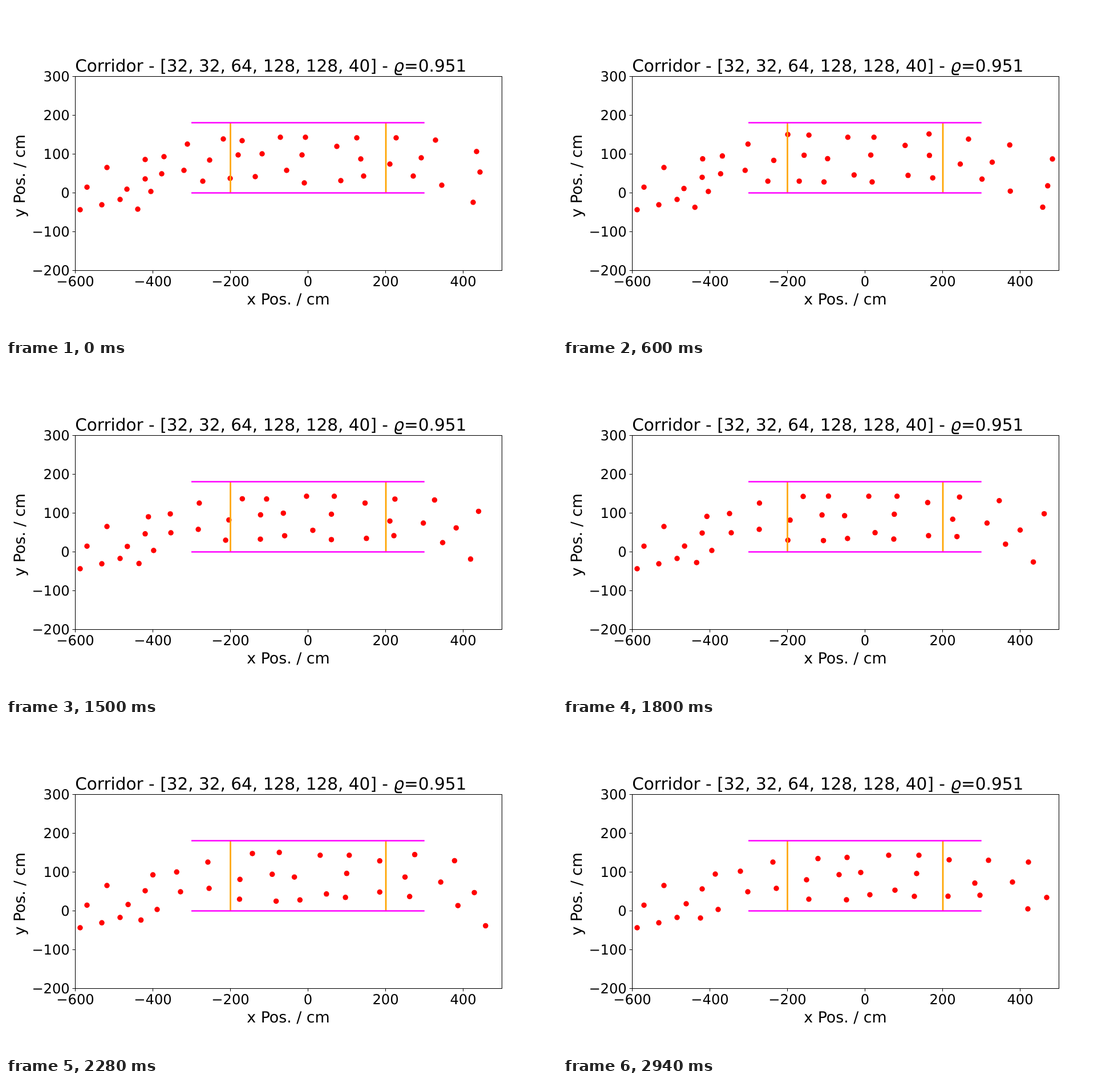
Write an HTML page that moves like this. It is 966 px wide and 580 px high and loops after 3000 ms.

```html
<!DOCTYPE html>
<html lang="en">
<head>
<meta charset="utf-8">
<title>Corridor</title>
<style>
  html, body { margin: 0; width: 100%; height: 100%; overflow: hidden; background: #fff; }
  svg { display: block; }
  text { font-family: "DejaVu Sans", sans-serif; font-size: 24.15px; fill: #000; text-rendering: geometricPrecision; }
  .title { font-size: 29.52px; white-space: pre; }
  .title tspan { font-style: italic; }
  .label { font-size: 26.83px; text-anchor: middle; }
  .axes { fill: none; stroke: #000; stroke-width: 1.05; }
  .wall { stroke: #f0f; stroke-width: 2.7; }
  .gate { stroke: orange; stroke-width: 2.7; }
  #crowd { fill: #f00; }
</style>
</head>
<body>
<svg width="966" height="580" viewBox="0 0 966 580">
  <clipPath id="plot"><rect x="121" y="123" width="748.5" height="340.5"/></clipPath>
  <g id="crowd" clip-path="url(#plot)"></g>
  <path class="gate" d="M393.5 204.5V327M666 204.5V327"/>
  <path class="wall" d="M325 204.5H733.7M325 327.5H733.7"/>
  <g id="ticks"></g>
  <rect class="axes" x="121.5" y="123.5" width="748" height="340"/>
  <text class="title" x="121.2" y="115">Corridor - [32, 32, 64, 128, 128, 40] - <tspan>ϱ</tspan>=0.951</text>
  <text class="label" x="495" y="522.7">x Pos. / cm</text>
  <text class="label" transform="translate(33.4 297.8) rotate(-90)">y Pos. / cm</text>
</svg>
<script>
const LOOP = 3000, STEP = 60, LAST = LOOP - STEP;
const SWAY = 1440;                     // ms from one side step to the next
const QUEUE_END = 400;                 // people left of here start slowly
const LIMIT = { x: 866, y: 359.5 };    // people beyond this have left
const crowd = document.getElementById('crowd');
const ticks = document.getElementById('ticks');
const people = [];

function add(parent, tag, attrs, text = '') {
  const el = document.createElementNS('http://www.w3.org/2000/svg', tag);
  for (const k in attrs) el.setAttribute(k, attrs[k]);
  el.textContent = text;
  return parent.appendChild(el);
}

const signed = v => String(v).replace('-', '\u2212');

for (let v = -600; v <= 400; v += 200) {
  const x = 529.5 + v * 0.68;
  add(ticks, 'path', { class: 'axes', d: `M${x} 463.5v5` });
  add(ticks, 'text', { x, y: 491.2, 'text-anchor': 'middle' }, signed(v));
}
for (let v = -200; v <= 300; v += 100) {
  const y = 327.5 - v * 0.68;
  add(ticks, 'path', { class: 'axes', d: `M121.5 ${y}h-5` });
  add(ticks, 'text', { x: 111.7, y: y + 8.9, 'text-anchor': 'end' }, signed(v));
}

// Start point, way walked in one loop, and width of the side step
function walk(x, y, dx = 0, dy = 0, sway = 0) {
  const ease = 1 + (Math.max(0, QUEUE_END - x) / 150) ** 2;
  people.push({ x, y, dx, dy, sway, ease, dot: add(crowd, 'circle', { r: 4.75 }) });
}

function place(p, t) {
  const u = t / LAST;
  return {
    x: p.x + p.dx * u ** p.ease,
    y: p.y + p.dy * u + p.sway * Math.sin(Math.PI * t / SWAY) ** 2
  };
}

// Waiting on the left
walk(130, 357);
walk(142, 317.5);
walk(168, 348.3);
walk(177, 283);
walk(200, 339);
walk(212, 321, 4, -6);
walk(231, 356, 10, -16);
walk(254, 325, 18);
walk(244, 269, 23, -6);
walk(244, 303, 0, -14);

// Approaching the corridor
walk(273, 294, 51);
walk(277, 264, 34, -6);
walk(312, 288, 62);
walk(318, 242, 50);
walk(345, 307, 86);
walk(357, 270, 70, 3);
walk(381, 233, 66, 3, -9);

// Inside the corridor
walk(393, 302, 104, 6, 4);
walk(407, 261, 77, 3);
walk(414, 236, 84, -2, -10);
walk(437, 299, 101, 0, 10);
walk(449, 259, 73, 1, 9);
walk(481, 230, 90);
walk(492, 288, 90, 3, 8);
walk(519, 261, 101, 1);
walk(525, 230, 99);
walk(523, 310, 93, -8);
walk(580, 246, 97, -8);
walk(587, 306, 88, -4, -9);
walk(615, 231, 131, 8, -9);
walk(622, 268, 100, 11, -9);
walk(627, 298, 104, 2, 3);

// Leaving on the right
walk(673, 277, 115);
walk(684, 231, 132, 11);
walk(714, 298, 101, 26);
walk(728, 266, 120, 38);
walk(753, 235, 148, 42);
walk(764, 314, 99, 51);
walk(825, 255, 162, 64);
walk(831, 291, 92, 118);
walk(819, 344, 108, 42);

function draw() {
  const t = Math.floor(performance.now() % LOOP / STEP) * STEP;
  for (const p of people) {
    const { x, y } = place(p, t);
    const gone = x > LIMIT.x || y > LIMIT.y;
    p.dot.setAttribute('visibility', gone ? 'hidden' : 'visible');
    p.dot.setAttribute('cx', x);
    p.dot.setAttribute('cy', y);
  }
  requestAnimationFrame(draw);
}
draw();
</script>
</body>
</html>
```
